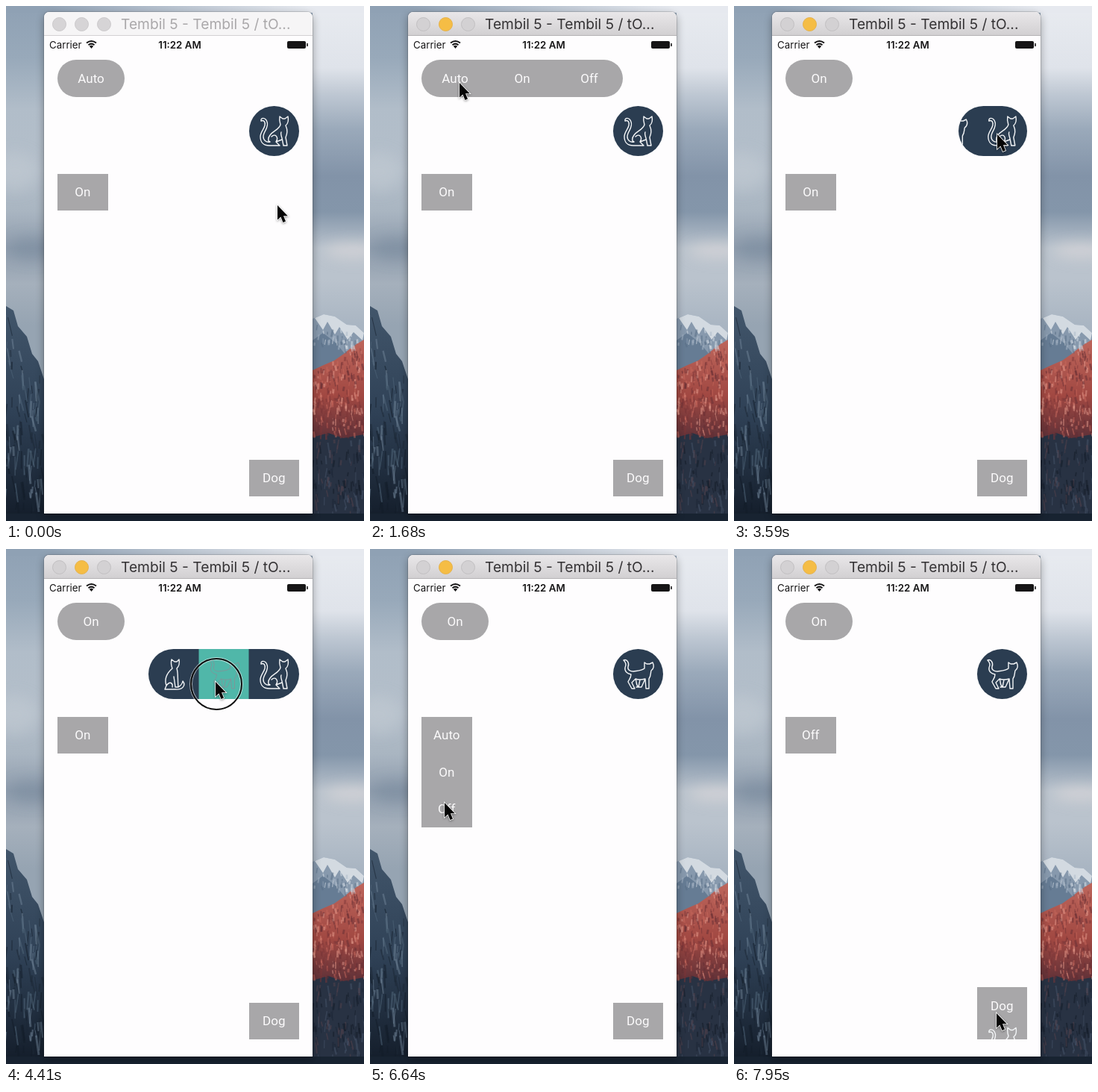
These frames come from a looping animation (480x690 px, 8000 ms). An HTML page:

```html
<!DOCTYPE html>
<html lang="en">
<head>
<meta charset="utf-8">
<title>Option pickers</title>
<style>
  html, body { margin: 0; width: 100%; height: 100%; overflow: hidden; }
  body { position: relative; background: #8b9caf; font-family: Inter, Roboto, sans-serif; }
  .backdrop, .cursor, .status svg { position: absolute; }
  .backdrop { left: 0; top: 0; }
  .window {
    position: absolute; left: 51px; top: 8px; width: 360px; height: 671.5px;
    background: #fefdfe; border-radius: 7px 7px 0 0;
    box-shadow: 0 0 0 1px #0002, 0 4px 12px #0005;
  }
  .bar {
    height: 32px; box-sizing: border-box; border-bottom: 1px solid #b4b2b4;
    border-radius: 7px 7px 0 0; background: linear-gradient(#e9e7e9, #d2d0d2);
  }
  .bar i {
    position: absolute; top: 6.5px; width: 19px; height: 19px; border-radius: 50%;
    box-sizing: border-box; background: #d3d1d3; border: 1px solid #c2c0c2;
  }
  .bar i:nth-child(1) { left: 11px; }
  .bar i:nth-child(2) { left: 41px; background: #f5bd45; border-color: #e6b24a; }
  .bar i:nth-child(3) { left: 71px; }
  .bar span { position: absolute; left: 103px; font: 19.2px/33px Inter, sans-serif; color: #343234; white-space: pre; }
  .inactive .bar { background: #f6f5f6; border-color: #d3d1d3; }
  .inactive .bar i { background: #d6d4d6; border-color: #cbc9cb; }
  .inactive .bar span { color: #aaa8aa; }
  .status span { position: absolute; top: 35px; font-size: 13.3px; line-height: 18px; color: #161516; white-space: pre; }
  .status .time { left: 0; width: 100%; text-indent: 4px; text-align: center; font-weight: 600; }
  .status svg { left: 0; top: 32px; }
  .picker { position: absolute; overflow: hidden; background: #a8a7a9; }
  .item {
    position: absolute; display: flex; align-items: center; justify-content: center;
    font: 17px Roboto, sans-serif; color: #fbfafb;
  }
  .item svg { flex: none; fill: none; stroke: #f3f5f7; stroke-width: 1.4; stroke-linejoin: round; stroke-linecap: round; }
  .item.pressed { background: #50b7a9; }
  .item.pressed svg { stroke: #7d9699; stroke-width: 1; }
  .ring {
    position: absolute; width: 66px; height: 66px; margin: -32px 0 0 -33px; border: 2px solid #111;
    border-radius: 50%; box-shadow: 0 0 0 1px #fff9, inset 0 0 0 1px #fff9;
  }
  .cursor { left: 1px; top: 0; overflow: visible; filter: drop-shadow(0 1px 1.5px #0006); }
</style>
</head>
<body>
<svg class="backdrop" width="480" height="690">
  <defs>
    <linearGradient id="skyTop">
      <stop offset=".1" stop-color="#8fa1b4"/><stop offset=".85" stop-color="#e6e9ef"/>
    </linearGradient>
    <linearGradient id="skyLeft" x2="0" y2="1">
      <stop stop-color="#8fa1b4"/><stop offset=".1" stop-color="#98a9ba"/>
      <stop offset=".2" stop-color="#b1bdc9"/><stop offset=".32" stop-color="#b4bfca"/>
      <stop offset=".4" stop-color="#a9b5c1"/><stop offset=".47" stop-color="#8f9dad"/>
      <stop offset=".54" stop-color="#a5b0bc"/><stop offset=".62" stop-color="#96a4b2"/>
    </linearGradient>
    <linearGradient id="skyRight" x2="0" y2="1">
      <stop stop-color="#e8ebf0"/><stop offset=".12" stop-color="#dfe3ea"/>
      <stop offset=".17" stop-color="#bfc8d3"/><stop offset=".24" stop-color="#9aa9ba"/>
      <stop offset=".33" stop-color="#8293a8"/><stop offset=".4" stop-color="#8496aa"/>
      <stop offset=".47" stop-color="#bac3cd"/><stop offset=".53" stop-color="#bac3cd"/>
      <stop offset=".62" stop-color="#a9b5c2"/>
    </linearGradient>
    <linearGradient id="rock" x2="0" y2="1">
      <stop stop-color="#42566b"/><stop offset=".5" stop-color="#2f4156"/><stop offset="1" stop-color="#131c29"/>
    </linearGradient>
    <linearGradient id="grove" x2="0" y2="1">
      <stop stop-color="#bd665c"/><stop offset=".55" stop-color="#a14842"/><stop offset="1" stop-color="#592f37"/>
    </linearGradient>
    <filter id="soft" x="-50%" y="-50%" width="200%" height="200%"><feGaussianBlur stdDeviation="9"/></filter>
  </defs>
  <rect width="412" height="690" fill="url(#skyLeft)"/>
  <rect x="411" width="69" height="690" fill="url(#skyRight)"/>
  <rect width="480" height="9" fill="url(#skyTop)"/>
  <g filter="url(#soft)">
    <ellipse cx="12" cy="222" rx="30" ry="26" fill="#c3cbd3" opacity=".5"/>
    <ellipse cx="35" cy="325" rx="32" ry="15" fill="#7c8c9e" opacity=".6"/>
    <ellipse cx="465" cy="328" rx="38" ry="10" fill="#dad7da" opacity=".7"/>
  </g>
  <path d="M0 402 L10 408 L16 429 L28 443 L35 466 L43 476 L51 500 V690 H0Z" fill="url(#rock)"/>
  <path d="M411 419 L426 413 L441 416 L457 427 L469 428 L480 438 V500 H411Z" fill="#8799ad"/>
  <path d="M414 418 L426 413 L441 416 L457 427 L469 428 L480 438 L478 448 L466 437 L458 447 L447 430 L441 440 L431 423 L425 434Z" fill="#d3dae1"/>
  <path d="M411 448 L425 438 L443 452 L455 467 L411 500Z" fill="#667c94"/>
  <path d="M411 488 L426 481 L440 475 L453 466 L465 456 L480 447 V584 H411Z" fill="url(#grove)"/>
  <path d="M411 578 L432 572 L452 579 L480 574 V690 H411Z" fill="#283243"/>
  <g id="texture" fill="none"></g>
  <path d="M0 680 H480 V690 H0Z" fill="#182331"/>
</svg>

<div class="window" id="window">
  <div class="bar"><i></i><i></i><i></i><span>Tembil 5 - Tembil 5 / tO...</span></div>
  <div class="status">
    <span style="left:7px">Carrier</span><span class="time">11:22 AM</span>
    <svg width="360" height="24" fill="none" stroke="#161516" stroke-width="2">
      <path d="M57 9.5 Q63.5 4.5 70 9.5 M59.5 12.2 Q63.5 9 67.5 12.2"/>
      <path d="M60.8 13.8 Q63.5 11.8 66.2 13.8 L63.5 17Z" fill="#161516" stroke="none"/>
      <rect x="326" y="7" width="25" height="10" rx="2" fill="#161516" stroke="none"/>
      <path d="M353 10 V14" stroke-width="1.6"/>
    </svg>
  </div>
</div>

<div id="pickers"></div>
<div class="ring" id="ring"></div>
<svg class="cursor" id="cursor" width="16" height="26">
  <path d="M0 0 V19.5 L4.4 15.5 L7.5 23 L11 21.5 L8 14.3 H13.8Z" fill="#050505" stroke="#fff" stroke-width="1.6" paint-order="stroke"/>
</svg>

<script>
const LOOP = 8000, SLIDE = 300, PRESS = 145;
const byId = id => document.getElementById(id);
const clamp = v => Math.min(1, Math.max(0, v));
const ease = v => { v = clamp(v); return v < .5 ? 2 * v * v : 1 - 2 * (1 - v) ** 2; };

const cat = d => `<svg width="67" height="67"><path d="${d}"/></svg>`;
const sitting = cat('M31 14 L35 17 H38 L41 14 C42 19 41 23 38 26 C40 32 39 42 40 51 H36 L34 37' +
  ' M31 14 C30 18 30 21 32 26 C25 32 21 40 24 49 L22 54 H36 C45 55 51 49 46 43 C45 49 41 50 40 51 M24 49 C29 42 33 46 32 51');
const walking = cat('M14 15 C19 13 22 19 20 24 C19 28 23 30 27 30 C33 29 38 29 42 26 V18 L45 20 H49 L53 18 C55 22 55 26 51 29' +
  ' M14 15 C17 18 18 21 16 25 C15 30 19 33 24 34 C24 39 21 41 20 44 L25 53 H29 L25 45 L30 40 C35 42 39 41 43 40' +
  ' L44 53 H48 V40 C51 36 50 32 51 29 M30 40 C32 44 30 48 34 51 H31 M43 40 L38 51 H34 L36 41');
const prowling = cat('M16 20 C15 15 22 15 24 21 C27 29 19 34 19 41 C19 46 23 49 28 48' +
  ' M16 20 C20 18 22 22 21 26 C20 31 15 35 15 41 C15 49 20 53 27 53' +
  ' M28 48 C25 47 25 43 28 39 C32 33 40 32 42 25 C41 22 40 19 41 14 L45 17 H48 L52 14 C53 19 53 23 49 26' +
  ' C52 33 51 37 49 42 L51 53 H46 L44 43 C43 40 42 37 43 35 M30 41 C35 36 40 42 36 48 L41 53 H27 M36 48 L44 45');

// dir is the axis and sense in which a picker unfolds
const pickers = [
  { x: 69, y: 72, w: 90, h: 49.5, dir: [1, 0], radius: 25, items: ['Auto', 'On', 'Off'], from: 0, to: 1, open: 1200, close: 2250 },
  { x: 325.5, y: 133.5, w: 67.5, h: 67.5, dir: [-1, 0], radius: 34, color: '#2b3d51', items: [sitting, walking, prowling], from: 2, to: 1, open: 3500, close: 4480, press: 4330 },
  { x: 69, y: 224.7, w: 67.5, h: 49.5, dir: [0, 1], radius: 0, items: ['Auto', 'On', 'Off'], from: 1, to: 2, open: 5800, close: 6820 },
  { x: 325.5, y: 607.5, w: 67.5, h: 49.5, dir: [0, -1], radius: 0, items: ['Dog', prowling, sitting], from: 0, to: 0, open: 7855, close: 9000 },
];

// Pointer stops: time, x, y
const stops = [
  [0, 363, 267], [150, 363, 267], [900, 119, 103], [1680, 119, 103], [2050, 204, 98], [2600, 204, 98],
  [3000, 326, 175], [3250, 352, 172], [3800, 352, 172], [4200, 280, 178], [4680, 280, 178],
  [5360, 143, 250], [5580, 103, 252], [6130, 103, 252], [6500, 99, 340], [7120, 99, 340], [7680, 351, 622],
];
const presses = [1060, 2110, 3360, 4330, 5660, 6680, 7715];

for (const p of pickers) {
  p.el = document.createElement('div');
  p.el.className = 'picker';
  p.el.style.borderRadius = p.radius + 'px';
  if (p.color) p.el.style.background = p.color;
  p.cells = p.items.map(content => {
    const cell = document.createElement('div');
    cell.className = 'item';
    cell.style.width = p.w + 'px';
    cell.style.height = p.h + 'px';
    cell.innerHTML = content;
    p.el.append(cell);
    return cell;
  });
  byId('pickers').append(p.el);
}

function drawPicker(p, t) {
  const opened = ease((t - p.open) / SLIDE) - ease((t - p.close) / SLIDE);
  const chosen = t < p.close ? p.from : p.to;
  const [dx, dy] = p.dir;
  const growX = 2 * p.w * opened * Math.abs(dx), growY = 2 * p.h * opened * Math.abs(dy);
  Object.assign(p.el.style, {
    left: p.x - (dx < 0 ? growX : 0) + 'px', top: p.y - (dy < 0 ? growY : 0) + 'px',
    width: p.w + growX + 'px', height: p.h + growY + 'px',
  });
  p.cells.forEach((cell, i) => {
    const step = i - chosen * (1 - opened);
    cell.style.transform = `translate(${dx ? step * p.w : 0}px, ${dy ? step * p.h : 0}px)`;
    cell.classList.toggle('pressed', i === p.to && t >= p.press && t < p.close);
  });
}

function pointer(t) {
  const next = stops.findIndex(s => s[0] > t);
  if (next < 0) return stops[stops.length - 1].slice(1);
  const [t0, x0, y0] = stops[next - 1], [t1, x1, y1] = stops[next];
  const k = ease((t - t0) / (t1 - t0));
  return [x0 + (x1 - x0) * k, y0 + (y1 - y0) * k];
}

// Seeded strokes for rock faces, snow and treetops
let seed = 7;
const random = () => (seed = seed * 16807 % 2147483647) / 2147483647;
function strokes(count, x, y, w, h, slope, length, colors) {
  let out = '';
  for (let i = 0; i < count; i++) {
    const u = random(), px = x + u * w, py = y + slope * u + random() * (h - slope * u);
    const len = length * (.4 + random());
    out += `<path d="M${px} ${py} l${(random() - .4) * len * .5} ${len}" stroke="${colors[i % colors.length]}" stroke-width="${1 + random() * 2}" opacity=".5"/>`;
  }
  return out;
}
byId('texture').innerHTML =
  strokes(110, 0, 412, 49, 255, 90, 20, ['#6f8397', '#121c28', '#52677c', '#1b2836']) +
  strokes(40, 412, 424, 60, 32, 14, 8, ['#e0e6ec', '#566b83', '#a9b8c8']) +
  strokes(260, 412, 489, 68, 84, -36, 7, ['#e39a8b', '#642e34', '#c96a5d', '#7d3638']) +
  strokes(110, 412, 580, 68, 98, 0, 11, ['#111926', '#46546a', '#1c2636', '#54424b']);

function draw(t) {
  pickers.forEach(p => drawPicker(p, t));
  const [x, y] = pointer(t);
  byId('cursor').style.transform = `translate(${x}px, ${y}px)`;
  Object.assign(byId('ring').style, {
    left: x + 'px', top: y + 'px',
    display: presses.some(p => t >= p && t < p + PRESS) ? '' : 'none',
  });
  byId('window').classList.toggle('inactive', t < presses[0]);
}

const start = performance.now();
function run() {
  draw((performance.now() - start) % LOOP);
  requestAnimationFrame(run);
}
run();
</script>
</body>
</html>
```
